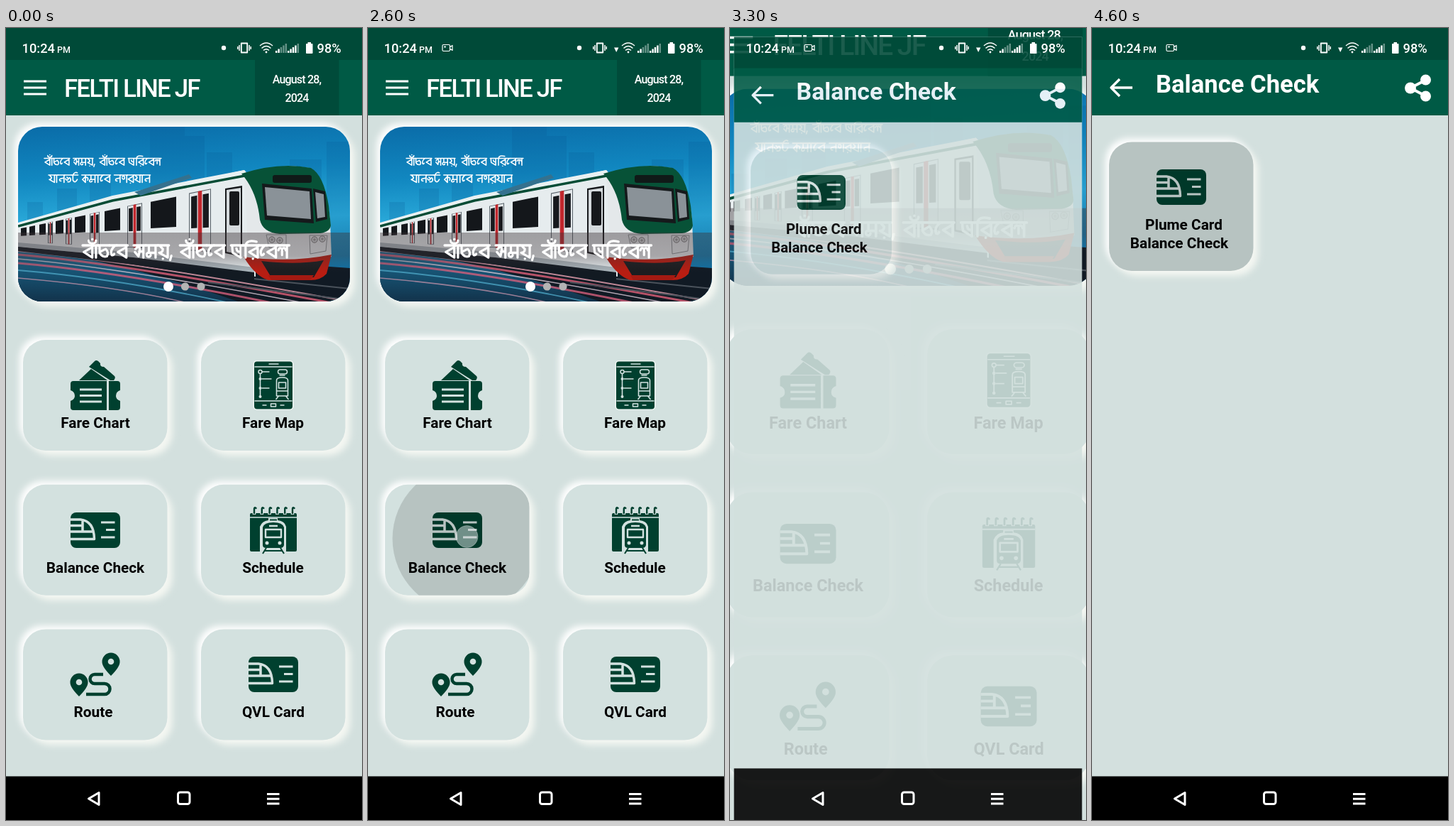
Write an HTML page that moves like this. It is 502x1115 px and loops after 5.2 s.

```html
<!DOCTYPE html>
<html lang="en">
<head>
<meta charset="utf-8">
<title>Transit app</title>
<style>
html, body { margin: 0; width: 100%; height: 100%; overflow: hidden; background: #d3e0de; }
svg { display: block; width: 100%; height: 100%; }
text { font-family: Roboto, "Liberation Sans", sans-serif; }
.label { font-size: 20.8px; font-weight: 700; text-anchor: middle; fill: #000; }
.line { fill: none; stroke: #fff; stroke-linejoin: round; }
.pale { fill: none; stroke: #d3e1df; stroke-linejoin: round; }
</style>
</head>
<body>
<svg id="stage" viewBox="0 0 502 1115"></svg>
<script>
const LOOP = 5200, STEP = 100;
const INK = '#00402f', BG = '#d3e0de';
const stage = document.getElementById('stage');

const rect = (x, y, w, h, fill, r = 0, extra = '') =>
  `<rect x="${x}" y="${y}" width="${w}" height="${h}" rx="${r}" fill="${fill}" ${extra}/>`;
const dot = (x, y, r, fill, extra = '') => `<circle cx="${x}" cy="${y}" r="${r}" fill="${fill}" ${extra}/>`;
const fill = (d, color, extra = '') => `<path d="${d}" fill="${color}" ${extra}/>`;
const line = (d, width, cls = 'line', extra = '') => `<path class="${cls}" d="${d}" stroke-width="${width}" ${extra}/>`;
const label = (x, y, s) => `<text class="label" x="${x}" y="${y}">${s}</text>`;
const at = (x, y, body) => `<g transform="translate(${x} ${y})">${body}</g>`;
const list = (n, fn) => Array.from({ length: n }, (_, i) => fn(i)).join('');

// Raised panel: white glow on both diagonals
const glow = (x, y, w, h, r) =>
  rect(x + 7, y + 7, w, h, '#f4f7f2', r, 'filter="url(#soft)"') +
  rect(x - 5, y - 5, w, h, '#fff', r, 'filter="url(#soft)"');
const tile = (x, y, h) => glow(x, y, 203.5, h, 32) + rect(x, y, 203.5, h, '#d3e1df', 32);

// Bengali lettering as pen strokes hanging from a headline: [advance, path]
const pen = {
  b: [9, 'M8 0V10L1 5.5 8 1.5'],
  a: [4, 'M2 0V10'],
  '^': [0, 'M-8-4a3 2.5 0 0 0 6 0M-5-5h.1'],
  c: [9, 'M1 0V6Q3 10 7 9 9 6 6 3L2 5'],
  e: [6, 'M5 0Q0 4 2 8A1.5 1.5 0 0 0 4 7'],
  s: [10, 'M8 0V10M8 5H4.5M1.5 3Q5-1 5 4L4 9 1 5.5'],
  m: [10, 'M8 0V10M2.5 0V6M8 6H2.5A1.7 1.7 0 1 0 4 8'],
  y: [9, 'M8 0V10L1 6Q4 6 4 3L2 1'],
  '.': [0, 'M-5 11h.1'],
  ',': [4, 'M2 8.5L1 12'],
  p: [10, 'M8 0V10L1.5 6Q1 3 1 0M8 5Q5 6 4.5 2.5'],
  r: [9, 'M8 0V10L1 5.5 8 1.5M4 11h.1'],
  i: [4, 'M2 10V0Q3-5 11-3'],
  S: [10, 'M8 0V10M1 4Q2 1 4 3V8M4 3Q6 1 7 4'],
  n: [9, 'M8 0V10M8 4L3 5A1.5 1.5 0 1 0 4 8'],
  j: [9, 'M1 5Q3 9 5 5 7 2 8 6 8 10 4 9M5 5L3 3'],
  T: [9, 'M2 0V7Q5 12 8 6M2 0Q5-5 8-3'],
  k: [10, 'M5 0V10L1 6 5 2M5 3Q10 3 8 7'],
  g: [9, 'M8 0V10M2 2Q6 0 5 5 3 7 2 4'],
};
function lettering(s, x, y, size, weight) {
  let pos = 0, out = '';
  for (const ch of s) {
    if (ch === ' ') { pos += 5; continue; }
    const [w, d] = pen[ch];
    const head = w && ch !== ',' ? `M0 0H${w}` : '';
    out += `<path transform="translate(${pos} 0)" d="${d}${head}"/>`;
    pos += w;
  }
  return `<g transform="translate(${x} ${y}) scale(${size})" fill="none" stroke="#fff" stroke-width="${weight}"
    stroke-linecap="round" stroke-linejoin="round">${out}</g>`;
}

function train() {
  // The side shrinks toward the left; these give its edges at any x
  const roof = x => 281 - (x - 17) * .232;
  const sill = x => 305 + (x - 17) * .115;
  const pane = (x, w, a, b, color) => {
    const y = (px, k) => (roof(px) + (sill(px) - roof(px)) * k).toFixed(1);
    return fill(`M${x} ${y(x, a)}L${x + w} ${y(x + w, a)}V${y(x + w, b)}L${x} ${y(x, b)}Z`, color);
  };
  const door = (x, w) => pane(x, w, .07, .82, '#59636a') + pane(x + 1, w - 2, .08, .81, '#e3e8ea') +
    pane(x + w * .1, w * .27, .12, .53, '#17191d') + pane(x + w * .63, w * .27, .12, .53, '#17191d') +
    pane(x + w * .41, w * .18, .07, .82, '#c1272d');
  const lamp = (x, y) => dot(x, y, 4.2, '#cfd3d5', 'stroke="#777"') + dot(x, y, 1.8, '#999');
  return fill('M17 277L150 240 336 200 352 220V350L17 308Z', '#e6ecee') +
    fill('M17 302L180 316 350 337V346L180 323 17 308Z', '#a9b4ba') +
    fill('M17 308L180 323 350 344V358L180 333 17 314Z', '#121a22') +
    fill('M17 274L150 236 336 200 344 209 150 244 17 281Z', '#e9f1f2') +
    line('M17 279L150 243 342 207', 3.5, '', 'stroke="#064c35" fill="none"') +
    fill('M181 231L258 206 262 211 190 236Z', '#35718e') +
    door(258, 31) + door(171, 21) + door(118, 14) + door(84, 9) + door(59, 7) +
    [[204, 36], [139, 22], [97, 15], [70, 11], [47, 9], [33, 8], [21, 8]]
      .map(([x, w]) => pane(x, w, .08, .5, '#14171b')).join('') +
    fill('M309 226L333 222V322L309 317Z', '#17191c') + fill('M311 228L331 225V319L311 315Z', '#d5dadd') +
    rect(315, 230, 14, 48, '#16181b', 2) +
    fill('M336 206Q390 188 431 198 451 212 457 270L459 322Q410 334 342 326Z', '#e4e8ea') +
    fill('M332 205Q385 188 430 197 448 207 455 250L458 278Q457 287 443 289L386 290Q362 288 358 270 354 230 332 205Z', '#075237') +
    rect(376, 207, 55, 11, '#101a18', 3) +
    fill('M361 219L431 226 434 275 365 270Z', '#15191b') + fill('M365 224L428 230 430 269 368 264Z', '#8a9298') +
    fill('M433 226L450 230 453 269 437 273Z', '#15191b') + fill('M436 231L448 234 450 266 439 268Z', '#8a9298') +
    `<g fill="none" stroke="#8b9194"><path d="M367 291H395V313L371 309ZM428 292H453L451 314 429 318Z"/></g>` +
    lamp(375, 298) + lamp(386, 299) + lamp(435, 298) + lamp(446, 297) +
    fill('M335 322Q400 331 459 319L452 346Q444 355 429 355H370Q352 350 335 322Z', '#b81d12') +
    fill('M360 328Q410 334 448 327L434 351H374Z', '#1b1d20') + fill('M370 348H434L429 355H374Z', '#a51a12');
}

function banner() {
  const towers = [[30, 245, 22], [72, 226, 28], [118, 214, 30], [203, 139, 49], [252, 152, 28], [283, 175, 36], [400, 185, 45], [452, 160, 33]];
  const streak = (y, end, color, w) =>
    line(`M17 ${y}Q160 ${y + 12} ${end} 388`, w, '', `fill="none" stroke="${color}" opacity=".8"`);
  return glow(17, 139, 468, 246, 34) + `<g clip-path="url(#bannerClip)">` +
    rect(17, 139, 468, 246, 'url(#sky)') +
    towers.map(([x, y, w]) => rect(x, y, w, 200, '#07578f', 0, 'opacity=".2"')).join('') +
    fill('M17 304L200 318 485 338V386H17Z', '#111a24') +
    fill('M17 308Q170 330 330 386H17Z', 'url(#track)') +
    streak(314, 500, '#e9a3b2', 2) + streak(319, 465, '#e0617a', 3) + streak(325, 425, '#d8c6d4', 1.6) +
    streak(331, 380, '#d4607c', 3) + streak(341, 320, '#4ba4c4', 1.8) + streak(352, 260, '#b98ea6', 1.6) +
    line('M285 358L485 383M300 348L485 367', 2, '', 'stroke="#4a525b"') +
    train() + rect(17, 288, 468, 55, 'url(#shade)') +
    lettering('ba^ceb smy., ba^ceb pirebS', 54, 183.5, .97, 1.6) +
    lettering('yanjT kmaeb ngryan', 60, 207, 1.04, 1.6) +
    lettering('ba^ceb smy., ba^ceb pirebS', 108, 306, 1.715, 1.9) +
    dot(229, 364, 7, '#fff') + dot(252.5, 364, 5.6, '#b4b4b4') + dot(275, 364, 5.6, '#b4b4b4') + '</g>';
}

const card = () => rect(0, 0, 70, 50, INK, 8) +
  line('M0 10H14Q33 12 33.5 37.5H0M17 10V27M0 18.5H17M0 27H32', 3.5, 'pale') +
  line('M43 14H62.5M50 24.5H62.5M43 35H62.5', 3.2, 'pale');

const ticket = () => fill('M12 28L29 12 52 28ZM26 9L34 1Q36-1 39 1L42 4Q41 9 47 9L62 22Q64 24 61 28H56Z', INK) +
  fill('M4 29H51V70H4Q0 70 0 66V57Q6 55 6 50 6 44 0 42V33Q0 29 4 29ZM54 29H66Q70 29 70 33V42Q64 44 64 50 64 55 70 57V66Q70 70 66 70H54Z', INK) +
  line('M13 41H44M13 49.5H44M13 58H44', 3, 'pale') + line('M52.5 29V70', 2, 'pale', 'stroke-dasharray="4 2"');

const phone = () => rect(-1, -1, 57, 70, '#eef4f1', 5) + rect(.5, .5, 54, 67, INK, 4) +
  line('M1 8H54M1 56H54M21 4H35M12 62H18M37 62H43M24 60H31V64H24Z', 1.5, 'pale') +
  line('M9 17V51M11 15H22M11 25H25M11 38H22', 1.6, 'pale') +
  dot(9, 15, 2.5, INK, 'class="pale" stroke-width="1.5"') + [25, 38, 50].map(y => dot(9, y, 2, '#d3e1df')).join('') +
  `<rect class="pale" x="34" y="12" width="13" height="6" rx="3" stroke-width="1.5"/>` +
  line('M32 49V27Q32 23 40 23 48 23 48 27V49ZM35 30H45V38H35ZM32 42H48M35 49L31 54M45 49L49 54M36 20H44', 1.6, 'pale');

const calendar = () => rect(0, 9, 66, 54, INK, 2) + line('M0 15H66', 1.6, 'pale') +
  list(6, i => line(`M${6 + i * 10.8} 11V3q0-3 2.5-1`, 4.6, 'pale') +
    line(`M${6 + i * 10.8} 9V3q0-3 2.5-1`, 2.4, '', `stroke="${INK}" fill="none" stroke-linecap="round"`)) +
  fill('M14 66V28Q17 20 26 19V16H39V19Q49 20 51 28V66Z', '#d3e1df') +
  fill('M18 54V29Q20 22 33 22 46 22 48 29V54Q47 58 43 58H23Q18 58 18 54Z', INK) +
  line('M22 32H44V43H22ZM27 27H39', 2.4, 'pale') + dot(24, 51, 2.5, '#d3e1df') + dot(42, 51, 2.5, '#d3e1df') +
  line('M23 58L18 66M43 58L48 66M21 62H45M28 18.5H38', 2, '', `stroke="${INK}"`);

const pin = (x, y) => fill(`M${x} ${y + 20}Q${x - 13} ${y + 7} ${x - 12.5} ${y}A12.5 12.5 0 0 1 ${x + 12.5} ${y}Q${x + 13} ${y + 7} ${x} ${y + 20}Z`, INK) +
  dot(x, y, 4.3, '#d3e1df');
const route = () => pin(57, 13) + pin(12, 42) +
  line('M46 31H34a6.5 6.5 0 0 0 0 13H48a7 7 0 0 1 0 15H22', 4.5, '', `fill="none" stroke="${INK}"`);

const bars = () => rect(0, 0, 502, 46, '#004a38') + rect(0, 45, 502, 78, '#005a45');
const base = () => rect(0, 0, 502, 1115, BG) + bars() + rect(0, 1053.5, 502, 200, '#000');
const ripple = (id, clip) => `<g clip-path="url(#${clip})"><circle id="${id}" fill="#000"/></g>`;

function home() {
  const cells = [[ticket, 91, 468, 'Fare Chart', 126], [phone, 349.5, 469, 'Fare Map', 376.5],
    [card, 91, 682, 'Balance Check', 126], [calendar, 344, 674, 'Schedule', 376.5],
    [route, 91, 879, 'Route', 123], [card, 342, 885, 'QVL Card', 377]];
  return base() + rect(351, 45, 118.5, 78, '#004b3a') +
    line('M25 75H57M25 84H57M25 93H57', 3.2) +
    `<text x="82" y="96.5" font-size="35" font-weight="500" letter-spacing="-1.9" fill="#fff">FELTI LINE JF</text>
    <g font-size="16" font-weight="500" letter-spacing="-.8" fill="#fff" text-anchor="middle">
      <text x="410" y="77.5">August 28,</text><text x="410" y="103.5">2024</text></g>` +
    banner() + cells.map(([icon, x, y, name, cx], i) => {
      const top = 439 + 203.7 * (i >> 1);
      return tile(i % 2 ? 275 : 24, top, 156) + at(x, y, icon()) + label(cx, top + 124, name);
    }).join('') + ripple('wave1', 'clip1');
}

const detail = () => base() + line('M57 84H28M39 72L27 84 39 96', 3.4) +
  `<text x="90" y="91" font-size="34.6" font-weight="700" fill="#fff">Balance Check</text>` +
  line('M471 73L449 84.5 471 96', 4) + dot(470.5, 73, 7.5, '#fff') + dot(449, 84.5, 8, '#fff') + dot(470.5, 96, 7.5, '#fff') +
  tile(24, 160.5, 181.5) + at(91, 199, card()) +
  label(129.5, 284, 'Plume Card') + label(123, 310, 'Balance Check') + ripple('wave2', 'clip2');

function systemIcons() {
  const signal = (x, lit) => list(5, i =>
    rect(x + i * 3.4, 32 - i * 2.5, 2.4, 3 + i * 2.5, '#fff', 0, `opacity="${i < lit ? 1 : .4}"`));
  return `<g fill="#fff" font-weight="500"><text x="22.5" y="35" font-size="18.3">10:24</text>
    <text x="72" y="35" font-size="12.5">PM</text><text x="438.5" y="35" font-size="18.3">98%</text></g>
    <g id="cam">${line('M106.5 23.5H114Q115.5 23.5 115.5 25V31Q115.5 32.5 114 32.5H106.5Q105 32.5 105 31V25Q105 23.5 106.5 23.5ZM115.5 27L119 24.5V31.5L115.5 29', 1.2)}
      ${dot(108.5, 26.5, 1.2, '#fff')}</g>
    <g id="alerts">${dot(307, 28, 3.2, '#fff')}
      ${line('M331.8 21.5H340.2V34.5H331.8Z', 1.9)}${line('M329 24V32M326.8 26V30M343 24V32M345.2 26V30', 1.5)}</g>
    <g id="traffic">${fill('M347 27.5H353.4L350.2 34Z', '#fff')}</g>` +
    line('M358 25Q367 17 376 25M360.5 28.5Q367 22.5 373.5 28.5M363 31.5Q367 28 371 31.5', 1.5) + dot(367, 34, 1.4, '#fff') +
    signal(380, 2) + signal(397, 4) + rect(423, 22, 9.5, 14, '#fff', 1) + rect(425.5, 20, 4.5, 3, '#fff') +
    line('M116.5 1085L131 1076.5V1093.5Z', 3) +
    `<rect class="line" x="242.5" y="1076" width="16.5" height="16.5" rx="3" stroke-width="3"/>` +
    line('M368 1078.5H385.5M368 1085.3H385.5M368 1092H385.5', 3);
}

stage.innerHTML = `<defs>
  <filter id="soft" x="-20%" y="-20%" width="140%" height="140%"><feGaussianBlur stdDeviation="5"/></filter>
  <linearGradient id="sky" x2=".1" y2="1"><stop stop-color="#0a6ca8"/><stop offset=".3" stop-color="#1187c0"/>
    <stop offset=".6" stop-color="#2fb0de"/><stop offset="1" stop-color="#0b6799"/></linearGradient>
  <linearGradient id="track" x2="0" y2="1"><stop stop-color="#1b6f96"/><stop offset="1" stop-color="#12324a"/></linearGradient>
  <linearGradient id="shade" x2="0" y2="1"><stop stop-color="#3c3236" stop-opacity=".42"/>
    <stop offset=".6" stop-color="#3c3236" stop-opacity=".36"/><stop offset="1" stop-color="#3c3236" stop-opacity="0"/></linearGradient>
  <clipPath id="bannerClip">${rect(17, 139, 468, 246, '#000', 34)}</clipPath>
  <clipPath id="clip1">${rect(24, 642.7, 203.5, 156, '#000', 32)}</clipPath>
  <clipPath id="clip2">${rect(24, 160.5, 203.5, 181.5, '#000', 32)}</clipPath></defs>
  <g id="home">${home()}</g><g id="detail">${detail()}</g>${systemIcons()}
  <circle id="touch" r="15.5" fill="#dfe6e8" fill-opacity=".5" stroke="#fff" stroke-opacity=".25"/>`;

const el = {};
stage.querySelectorAll('g[id], circle[id]').forEach(n => el[n.id] = n);
const set = (node, attrs) => { for (const k in attrs) node.setAttribute(k, attrs[k]); };
const clamp = v => Math.max(0, Math.min(1, v));

// Two joined Béziers: fast start, very slow finish
function ease(x) {
  const first = x < 1 / 6;
  const [xs, ys] = first ? [[0, .05, .1333, 1 / 6], [0, 0, .06, .4]] : [[1 / 6, .2083, .25, 1], [.4, .82, 1, 1]];
  const bez = (p, s) => (1 - s) ** 3 * p[0] + 3 * s * (1 - s) ** 2 * p[1] + 3 * s * s * (1 - s) * p[2] + s ** 3 * p[3];
  let lo = 0, hi = 1;
  for (let i = 0; i < 24; i++) {
    const mid = (lo + hi) / 2;
    if (bez(xs, mid) < x) lo = mid; else hi = mid;
  }
  return bez(ys, lo);
}
const zoom = s => `translate(251 557.5) scale(${s}) translate(-251 -557.5)`;

// Ripple drifts from the finger to the tile's centre as it widens
function wave(node, age, cy, full, alpha) {
  const k = clamp(age / 100);
  set(node, { cx: 138.5 - 13 * k, cy, r: 104 + (full - 104) * k, opacity: age < 0 ? 0 : .135 * alpha });
}

function draw(ms) {
  const t = Math.floor(ms % LOOP / STEP) * STEP;
  set(el.cam, { opacity: clamp((t - 200) / 200) });
  set(el.alerts, { transform: `translate(${t < 600 ? 0 : -9} 0)` });
  set(el.traffic, { opacity: t < 600 ? 0 : 1 });

  wave(el.wave1, t - 2600, 719, 132, clamp((3000 - t) / 300));
  wave(el.wave2, t - 4300, 251, 140, 1);
  const tap1 = t === 2600, tap2 = t >= 4300 && t < 4500;
  set(el.touch, { cx: 139.5, cy: tap1 ? 716 : 252, opacity: tap1 || tap2 ? 1 : 0 });

  const age = t - 3176, p = ease(clamp(age / 400));
  set(el.home, { transform: zoom(1 + .15 * p), display: t < 3700 ? 'inline' : 'none' });
  set(el.detail, { transform: zoom(.85 + .15 * p), opacity: clamp((age - 50) / 83) });
}

function tick() {
  draw(performance.now());
  requestAnimationFrame(tick);
}
tick();
</script>
</body>
</html>
```
